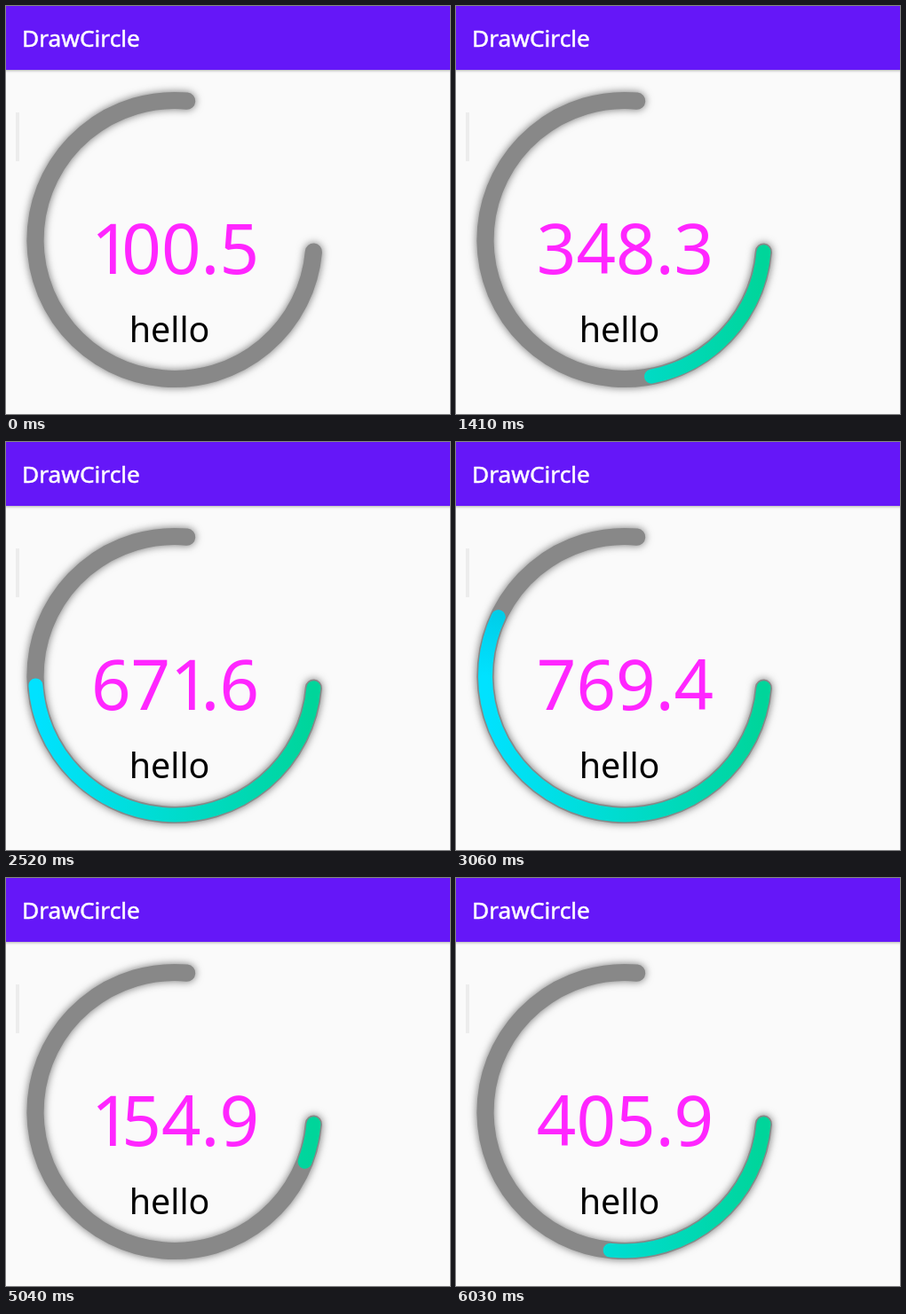
An HTML page that plays this animation: 500x460 px, repeating every 6.06 s.

```html
<!DOCTYPE html>
<html lang="en">
<head>
<meta charset="utf-8">
<title>DrawCircle</title>
<style>
  html, body { margin: 0; width: 100%; height: 100%; overflow: hidden; background: #fafafa; }
  #stage { position: relative; width: 500px; height: 460px; overflow: hidden; font-family: "Noto Sans", "Open Sans", sans-serif; }
  svg { position: absolute; inset: 0; }
  text { white-space: pre; }
  .bar { filter: drop-shadow(0 1px 1.5px rgba(0, 0, 0, .3)); }
  .arc { fill: none; stroke-linecap: round; }
  .track { stroke: #888; stroke-width: 19.2; filter: drop-shadow(0 0 5px rgba(0, 0, 0, .55)); }
  .progress { stroke: url(#tint); stroke-width: 16; }
  .shade { stroke: url(#dim); }
  .title { font-size: 26.3px; font-weight: 500; fill: #fff; stroke: #fff; stroke-width: .5; }
  .label { font-size: 39.4px; fill: #000; }
  #value { font-size: 78px; fill: #ff26ff; text-anchor: middle; }
  .one { letter-spacing: -.13em; }
</style>
</head>
<body>
<div id="stage">
  <svg width="500" height="460" viewBox="0 0 500 460">
    <defs>
      <linearGradient id="tint" gradientUnits="userSpaceOnUse" x1="346" y1="0" x2="34" y2="0">
        <stop offset="0" stop-color="#00d59a"/>
        <stop offset="1" stop-color="#00e2ff"/>
      </linearGradient>
      <linearGradient id="dim" gradientUnits="userSpaceOnUse" x1="0" y1="264" x2="0" y2="107">
        <stop offset="0" stop-color="#0098b8" stop-opacity="0"/>
        <stop offset="1" stop-color="#0098b8" stop-opacity=".6"/>
      </linearGradient>
    </defs>
    <rect class="bar" x="-5" y="-5" width="510" height="77" fill="#6517f8"/>
    <text class="title" x="18" y="46">DrawCircle</text>
    <rect x="11" y="120" width="4" height="55" fill="#ececec"/>
    <path class="arc track"/>
    <path class="arc progress" pathLength="270"/>
    <path class="arc progress shade" pathLength="270"/>
    <text id="value" x="190.5" y="302"></text>
    <text class="label" x="138.7" y="378.7">hello</text>
  </svg>
</div>
<script>
  const LOOP = 6060, STEP = 30, MIN = 100, MAX = 800;
  const CX = 190, CY = 263.5, R = 157, START = 5, SPAN = 270;

  // [time in ms, linear progress of the sweep]
  const KEYS = [
    [0, .017], [1410, .4062], [1980, .5705], [3060, .866], [3560, 1],
    [4349, 1], [4350, 0], [4390, 0], [5040, .1807], [6030, .4598], [6060, .468]
  ];

  const progress = document.querySelectorAll('.progress');
  const value = document.getElementById('value');

  function point(deg) {
    const a = deg * Math.PI / 180;
    return `${CX + R * Math.cos(a)} ${CY + R * Math.sin(a)}`;
  }

  function linear(t) {
    const i = KEYS.findIndex(k => k[0] > t);
    const [t0, x0] = KEYS[i - 1], [t1, x1] = KEYS[i];
    return x0 + (x1 - x0) * (t - t0) / (t1 - t0);
  }

  const ease = x => (1 - Math.cos(Math.PI * x)) / 2;

  function draw(t) {
    const v = MIN + (MAX - MIN) * ease(linear(t));
    // The arc advances in whole degrees.
    const sweep = Math.floor((v - MIN) * .3 + 1e-6);
    for (const p of progress) {
      p.style.display = sweep ? '' : 'none';
      p.setAttribute('stroke-dasharray', `${sweep} 999`);
    }
    value.innerHTML = v.toFixed(1).replace(/1/g, '<tspan class="one">1</tspan>');
  }

  const d = `M${point(START)}A${R} ${R} 0 1 1 ${point(START + SPAN)}`;
  document.querySelectorAll('.arc').forEach(p => p.setAttribute('d', d));

  const begin = performance.now();
  function tick() {
    const t = (performance.now() - begin) % LOOP;
    draw(Math.floor(t / STEP) * STEP);
    requestAnimationFrame(tick);
  }
  tick();
</script>
</body>
</html>
```
